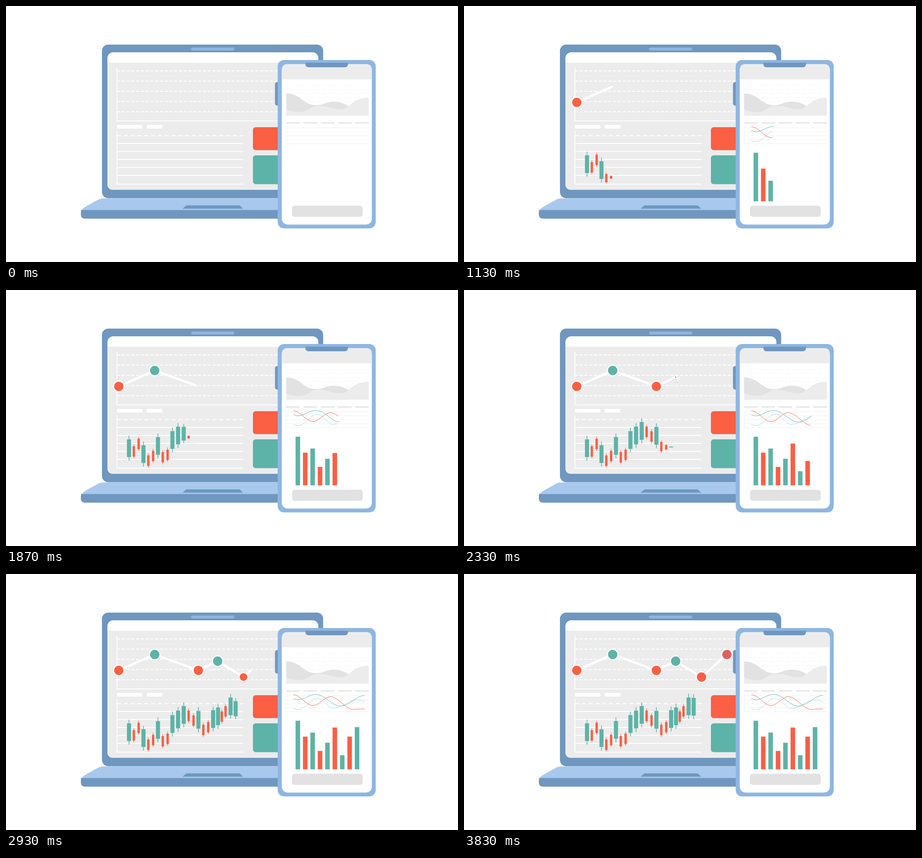
Write an HTML page that moves like this. It is 994x564 px and loops after 6.01 s.

```html
<!DOCTYPE html>
<html lang="en">
<head>
<meta charset="utf-8">
<title>Trading charts</title>
<style>
  html, body { margin: 0; width: 100%; height: 100%; overflow: hidden; background: #fff; }
  svg { display: block; width: 100%; height: 100%; }
  .navy { fill: #6f97bf; }
  .sky { fill: #8eb6e1; }
  .pale { fill: #ececec; }
  .gray { fill: #e2e2e2; }
  .white { fill: #fff; }
  .red { fill: #fb5f44; }
  .green { fill: #5db3a7; }
  .line { fill: none; }
</style>
</head>
<body>
<svg viewBox="0 0 994 564">
  <!-- laptop -->
  <rect class="navy" x="211" y="85" width="486.5" height="338.5" rx="14"/>
  <rect class="sky" x="407" y="91.5" width="95" height="6.5" rx="3"/>
  <rect class="white" x="223" y="102" width="464" height="303" rx="13"/>
  <path class="pale" d="M223 125H687V405H236Q223 405 223 392Z"/>
  <path fill="#a8c9ed" d="M165 451Q170 444 184 437L204 426Q208 424 214 424H700V451Z"/>
  <path class="navy" d="M165 449.5H700V468.5H174Q164.5 468.5 164.5 459Z"/>
  <path class="navy" d="M388 446.5L397 439.3H514L521.5 446.5Z"/>
  <g id="laptopGrid" stroke="#fff" stroke-width="1.8">
    <path class="line" d="M244 136V253.2H600M244 275V393"/>
  </g>
  <path class="white" d="M244 262H300V270H244ZM309 262H343.5V270H309Z"/>
  <rect class="red" x="543" y="267" width="80" height="50.5" rx="6"/>
  <rect class="green" x="543" y="329" width="80" height="63.5" rx="6"/>
  <g id="candles"></g>
  <path id="trend" class="line" stroke="#fff" stroke-width="5" stroke-linejoin="round" stroke-linecap="round"/>
  <g id="dots"></g>
  <rect class="navy" x="591.5" y="167.5" width="30" height="52" rx="5"/>

  <!-- phone -->
  <rect class="sky" x="597.5" y="119" width="215.5" height="371" rx="14"/>
  <rect class="white" x="606.5" y="128" width="198" height="353.5" rx="13"/>
  <path class="pale" d="M606.5 161.5V141Q606.5 128 619.5 128H791.5Q804.5 128 804.5 141V161.5Z"/>
  <path class="navy" d="M658.5 125H752V128Q752 135 745 135H665.5Q658.5 135 658.5 128Z"/>
  <g id="phoneGrid" stroke="#efefef">
    <path class="line" d="M616.5 264V304"/>
  </g>
  <path class="gray" d="M616 192.5C651 194 652 218.5 683 218.5C698 218.5 703 211 721 211C738 211 747 217 754 221V241.5H616Z"/>
  <path class="pale" d="M616 227C626 233 639 234 647 233.5C666 232 668 220 689 220C706 220 718 227.5 735 227.5C758 227.5 757 203 798 202V241.5H616Z"/>
  <path stroke="#e9e9e9" stroke-width="3.5" stroke-dasharray="30 8" d="M616 257.7H798"/>
  <rect class="gray" x="629" y="440" width="155.5" height="24.5" rx="6"/>
  <g id="bars"></g>
  <g id="curves" class="line" stroke-width="1" stroke-opacity=".9"></g>
</svg>
<script>
const LOOP = 6010;
const DRAW_START = 478;
const TREND_SPEED = 0.1315; // px per ms
const byId = id => document.getElementById(id);

function add(parent, tag, attrs) {
  const node = document.createElementNS('http://www.w3.org/2000/svg', tag);
  for (const key in attrs) node.setAttribute(key, attrs[key]);
  return parent.appendChild(node);
}

const clamp = v => Math.min(1, Math.max(0, v));
const ease = v => v < 0.5 ? 2 * v * v : 1 - 2 * (1 - v) ** 2;
const grow = (t, start, duration) => ease(clamp((t - start) / duration));

// Linear interpolation through [position, value] keys
function interpolate(keys, at) {
  const next = Math.max(1, keys.findIndex(([p]) => p >= at));
  const [[p0, v0], [p1, v1]] = [keys[next - 1], keys[next]];
  return v0 + (v1 - v0) * (at - p0) / (p1 - p0);
}

// Curve through its turning points, flat at each of them
const wavePath = points => points.reduce((d, [x, y], i) => {
  if (!i) return `M${x} ${y}`;
  const [px, py] = points[i - 1], pull = (x - px) * 0.37;
  return `${d}C${px + pull} ${py} ${x - pull} ${y} ${x} ${y}`;
}, '');

function reveal(path, length) {
  path.setAttribute('visibility', length > 0 ? 'visible' : 'hidden');
  path.setAttribute('stroke-dasharray', `${length} 2000`);
}

function gridLines(id, x1, x2, top, gap, count, attrs) {
  for (let i = 0; i < count; i++) {
    add(byId(id), 'path', { d: `M${x1} ${top + i * gap}H${x2}`, ...attrs });
  }
}
gridLines('laptopGrid', 244, 600, 143, 22.5, 5, { 'stroke-dasharray': '6.5 4' });
gridLines('laptopGrid', 244, 522, 285.5, 17.5, 1, { 'stroke-dasharray': '9 6' });
gridLines('laptopGrid', 244, 522, 303, 17.5, 5);
gridLines('laptopGrid', 244, 522, 392.5, 0, 1);
gridLines('phoneGrid', 616, 798, 175, 9, 5, { 'stroke-dasharray': '4 3', stroke: '#f3f3f3' });
gridLines('phoneGrid', 616, 798, 268.3, 8.8, 5);

// Trend line; each dot pops when the line reaches it
const trendPoints = [[248, 212.3], [327, 177.4], [423, 212.3], [465.5, 192], [522.3, 227], [578.2, 177.4]];
const trend = byId('trend');
trend.setAttribute('d', 'M' + trendPoints.join('L'));
let trendLength = 0;
const dots = trendPoints.map(([x, y], i) => {
  if (i) trendLength += Math.hypot(x - trendPoints[i - 1][0], y - trendPoints[i - 1][1]);
  const node = add(byId('dots'), 'g');
  const last = i === trendPoints.length - 1;
  add(node, 'circle', { r: 12.7, class: 'white' });
  add(node, 'circle', last ? { r: 10.4, fill: '#e15f5c' } : { r: 10.4, class: i % 2 ? 'green' : 'red' });
  return { node, x, y, start: i ? DRAW_START + trendLength / TREND_SPEED : 410 };
});

// Candles grow upwards from the low end of the wick
const candleX = [[0, 270.5], [9, 366], [11, 390.8], [18, 466.3], [20, 482.8], [22, 505]];
const candleLow = [[0, 376], [1, 371], [2, 354.5], [3, 389], [4, 391.5], [6, 371], [7, 384], [8, 378.5],
  [9, 358], [12, 328], [15, 359], [18, 341], [20, 318], [22, 320]];
const candleStart = [[0, DRAW_START], [17, 2280], [22, 2685]];
const candles = [...'grrgrrgrrgggrrgrrggrrgg'].map((kind, i) => {
  const green = kind === 'g';
  const node = add(byId('candles'), 'g', { class: green ? 'green' : 'red' });
  const box = (w, bottom, h) => add(node, 'rect', { x: -w / 2, y: -bottom - h, width: w, height: h });
  if (green) { box(1.5, 0, 55); box(9, 8, 39); }
  else { box(1.1, 0, 31.5); box(5.2, 4, 23); }
  return {
    node,
    x: interpolate(candleX, i),
    y: interpolate(candleLow, i),
    start: interpolate(candleStart, i)
  };
});

const bars = [107, 72, 81, 40.5, 58.5, 92, 31, 72, 93].map((h, i) => {
  const node = add(byId('bars'), 'rect', { x: -5, y: -h, width: 10, height: h, class: i % 2 ? 'red' : 'green' });
  return { node, x: 641.8 + i * 16.27, y: 430.3, start: 500 + i * 233 };
});

const curves = [
  ['#a3d3f6', [[632, 297], [641, 299], [686, 273.5], [719, 296], [773, 277], [789, 280.5]]],
  ['#5db3a7', [[632, 274.5], [641, 277.3], [681, 265.2], [736, 291], [789, 267.5]]],
  ['#fb5f44', [[632, 266], [675, 289.8], [713, 270.3], [764, 298.3], [789, 297]]]
].map(([stroke, points]) => {
  const path = add(byId('curves'), 'path', { stroke, d: wavePath(points) });
  return { path, length: path.getTotalLength() };
});

function place({ node, x, y }, sx, sy) {
  node.setAttribute('transform', `translate(${x} ${y}) scale(${sx} ${sy})`);
  node.setAttribute('visibility', sy > 0 ? 'visible' : 'hidden');
}

function render(now) {
  const t = now % LOOP;
  reveal(trend, Math.min(trendLength, Math.max(0, t - DRAW_START) * TREND_SPEED));
  for (const dot of dots) {
    const s = grow(t, dot.start, 220);
    place(dot, s, s);
  }
  for (const candle of candles) place(candle, 1, grow(t, candle.start, 340));
  for (const bar of bars) place(bar, 1, grow(t, bar.start, 311));
  for (const { path, length } of curves) reveal(path, length * clamp((t - DRAW_START) / 2190));
  requestAnimationFrame(render);
}
requestAnimationFrame(render);
</script>
</body>
</html>
```
